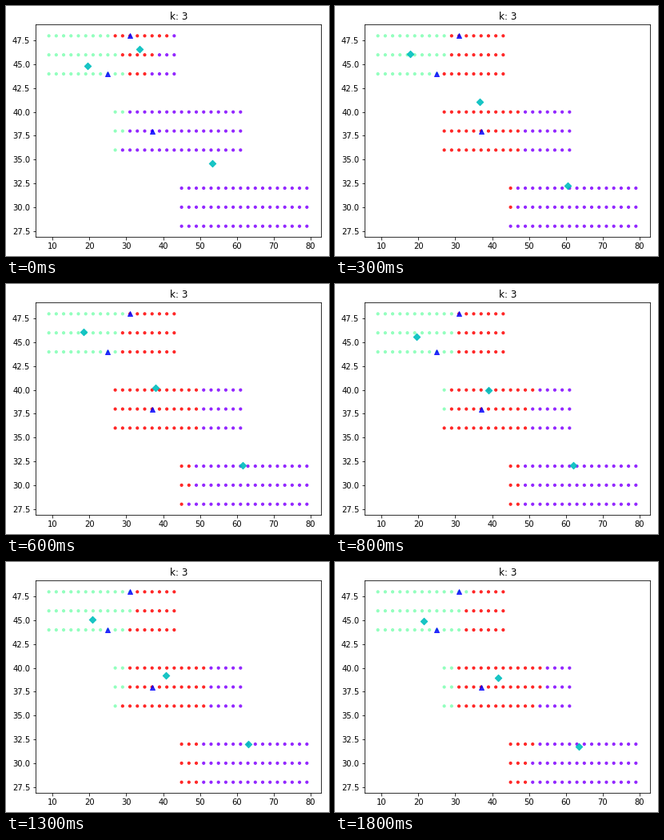
Write a matplotlib script that moves like this. It is 404 px wide and 313 px high and loops after 2 s.

```python
import numpy as np
import matplotlib.pyplot as plt
from matplotlib.animation import FuncAnimation

W, H, DPI = 404, 313, 72
STEPS = 19
FRAMES = 20
COLORS = np.array([(0.5, 0, 1), (0.5, 1, 0.7), (1, 0, 0)])
SEEDS = np.array([(37, 38), (25, 44), (31, 48)], float)


def block(x0, y0):
    """Grid of 18 by 3 points, two units apart."""
    return [(x0 + 2 * i, y0 + 2 * j) for j in range(3) for i in range(18)]


points = np.array(block(9, 44) + block(27, 36) + block(45, 28), float)


def kmeans(centers, steps):
    """Labels and cluster means after each iteration."""
    history = []
    for _ in range(steps):
        gaps = points[:, None] - centers[None]
        labels = (gaps ** 2).sum(axis=2).argmin(axis=1)
        centers = np.array([points[labels == k].mean(axis=0)
                            for k in range(len(centers))])
        history.append((labels, centers))
    return history


history = kmeans(SEEDS, STEPS)

plt.rcParams["font.family"] = "DejaVu Sans"
fig = plt.figure(figsize=(W / DPI, H / DPI), dpi=DPI, facecolor="white")
ax = fig.add_axes([37.3 / W, 23.6 / H, 357.12 / W, 266.11 / H])
ax.set_xlim(5.46, 82.92)
ax.set_ylim(26.85, 49.18)
ax.set_xticks(range(10, 81, 10))
ax.set_yticks(np.arange(27.5, 48, 2.5))
ax.set_title("k: 3")

dots = ax.scatter(*points.T, s=10, alpha=0.8, linewidths=1)
ax.scatter(*SEEDS.T, s=36, marker="^", color="blue", alpha=0.8, linewidths=1)
means = ax.scatter(*SEEDS.T, s=36, marker="D", color="c", alpha=0.9,
                   linewidths=1)


def draw(i):
    labels, centers = history[min(i, STEPS - 1)]
    dots.set_color(COLORS[labels])
    means.set_offsets(centers)
    return dots, means


anim = FuncAnimation(fig, draw, frames=FRAMES, interval=100, repeat=True,
                     repeat_delay=0)
plt.show()
```
